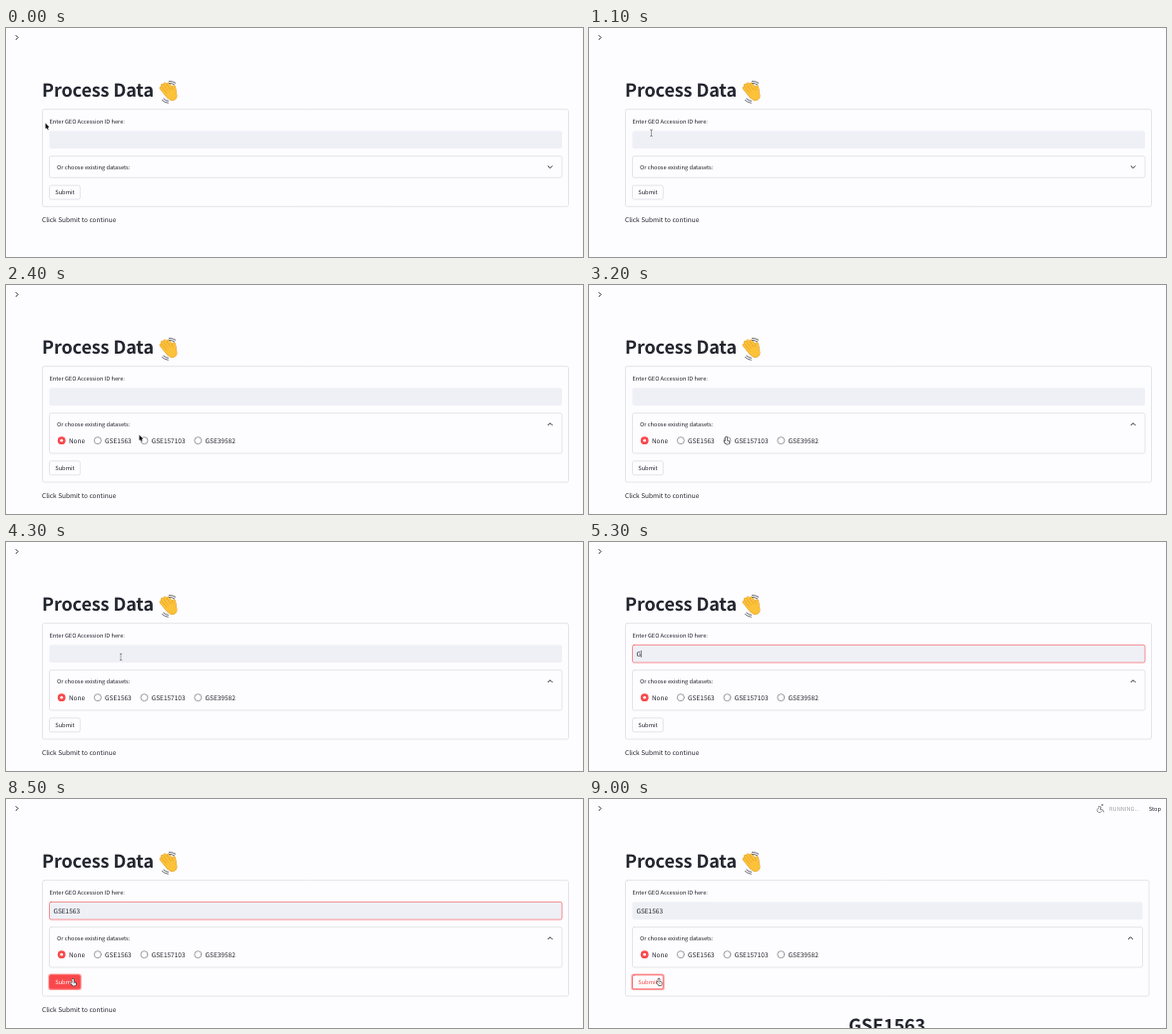
These frames come from a looping animation (578x230 px, 9.1 s). An HTML page with a canvas:

```html
<!DOCTYPE html>
<html lang="en">
<head>
<meta charset="utf-8">
<title>Process Data</title>
<style>
  html, body { margin: 0; width: 100%; height: 100%; overflow: hidden; background: #fdfcfe; }
  canvas { display: block; width: 578px; height: 230px; }
</style>
</head>
<body>
<canvas></canvas>
<script>
const W = 578, H = 230, LOOP = 9100, STEP = 100;
const INK = '#22242e', RED = '#f9484b', LINE = '#dadae1', GRAY = '#85868e', PAPER = '#fdfcfe';
const FONT = '"Noto Sans CJK JP", "Noto Sans CJK SC", "Noto Sans CJK", "Open Sans", sans-serif';
const SMALL = 5.67, BODY = 6.5, TITLE = 18;

const canvas = document.querySelector('canvas');
const c = canvas.getContext('2d');
const scale = window.devicePixelRatio || 1;
canvas.width = W * scale;
canvas.height = H * scale;

// Times of the main events in ms
const OPEN = 1760, RADIOS = 2000, FOCUS = 4700, HIDE = 5100, SHOW = 7500;
const PRESS = 8300, RELEASE = 8600, RUNNING = 8700, RESULT = 8900;

const ID = 'GSE1563';
const RADIO_LABELS = ['None', 'GSE1563', 'GSE157103', 'GSE39582'];

// Letters come quickly, digits after a pause
const keyTime = i => i < 3 ? 5200 + 250 * i : 6200 + 333 * (i - 3);

// Pointer stops: time, x, y
const STOPS = [
  [0, 39.5, 95.5], [1000, 60, 104], [1900, 131, 147.5], [3200, 138.5, 156.5],
  [4300, 115, 115.5], [7500, 95, 113], [8100, 66, 184.5], [9000, 71, 184]
];

function pointerAt(t) {
  const i = Math.max(1, STOPS.findIndex(s => s[0] >= t));
  const [t0, x0, y0] = STOPS[i - 1], [t1, x1, y1] = STOPS[i];
  const p = (t - t0) / (t1 - t0), e = p * p * (3 - 2 * p);
  return { x: x0 + (x1 - x0) * e, y: y0 + (y1 - y0) * e };
}

function text(s, x, y, size = BODY, color = INK, weight = 400) {
  c.font = `${weight} ${size}px ${FONT}`;
  c.textRendering = 'geometricPrecision';
  c.letterSpacing = weight === 700 ? '-0.1px' : '0px';
  c.fillStyle = color;
  c.fillText(s, x, y);
  return c.measureText(s).width;
}

function box(x0, y0, x1, y1, stroke, fill, width = 0.7) {
  c.beginPath();
  c.roundRect(x0, y0, x1 - x0, y1 - y0, 1.8);
  if (fill) { c.fillStyle = fill; c.fill(); }
  if (stroke) { c.strokeStyle = stroke; c.lineWidth = width; c.stroke(); }
}

function line(points, color, width) {
  c.beginPath();
  points.forEach(([x, y]) => c.lineTo(x, y));
  c.strokeStyle = color;
  c.lineWidth = width;
  c.lineCap = c.lineJoin = 'round';
  c.stroke();
}

function disc(x, y, r, fill) {
  c.beginPath();
  c.arc(x, y, r, 0, 2 * Math.PI);
  c.fillStyle = fill;
  c.fill();
}

function arc(x, y, r, from, to, color, width = 0.8) {
  c.beginPath();
  c.arc(x, y, r, from, to);
  c.strokeStyle = color;
  c.lineWidth = width;
  c.stroke();
}

// Draws around a local origin, turned by an angle
function at(x, y, angle, paint) {
  c.save();
  c.translate(x, y);
  c.rotate(angle);
  paint();
  c.restore();
}

function wavingHand() {
  at(165, 66, -0.65, () => {
    const edge = '#dd9826', skin = '#fcc23a';
    const thumb = [[1, 4], [5, 0], [6.5, -3.5]];
    line([[0, 1], [0, 2.5]], edge, 10);
    for (let i = 0; i < 4; i++) {
      const x = i * 2.5 - 3.9, tip = -9 - 3 * Math.sin((i + 0.6) * 0.85);
      const finger = [[x, 1], [x * 1.1, tip]];
      line(finger, edge, 3.2);
      line(finger, skin, 2.5);
    }
    line(thumb, edge, 3.6);
    line([[0, 1], [0, 2.5]], skin, 9.2);
    line(thumb, skin, 2.8);
    for (const r of [9, 11]) {
      arc(0, -2, r, -0.95, -0.35, '#555b66');
      arc(0, -2, r, 2.35, 2.95, '#555b66');
    }
  });
}

function chevron(x, y, angle, color) {
  at(x, y, angle, () => line([[-2, -1], [0, 1], [2, -1]], color, 1));
}

function outlined(parts, dark, light, width) {
  parts.forEach(p => line(p, dark, width + 1.1));
  parts.forEach(p => line(p, light, width));
}

function drawPointer(kind, { x, y }) {
  at(x, y, 0, () => {
    if (kind === 'text') {
      const serif = s => [[-1.1, 3.3 * s], [0, 2.9 * s], [1.1, 3.3 * s]];
      outlined([[[0, -3], [0, 3]], serif(-1), serif(1)], '#fff', '#555', 0.6);
    } else if (kind === 'hand') {
      outlined([[[-1, -3], [-1, 1]], [[-2.3, 0.7], [-0.5, 2.5]], [[0, 0.8], [1.2, 0.8], [1, 2.6], [0, 2.6]]],
        '#222', '#fff', 1.4);
    } else {
      const arrow = [[0, 0], [0, 5.5], [3.8, 4], [0, 0]];
      line(arrow, '#fff', 1);
      c.fillStyle = '#111';
      c.fill();
      line([[1.6, 4.2], [2.6, 6.3]], '#111', 1);
    }
  });
}

function drawStatus() {
  disc(514.2, 6, 1.1, GRAY);
  line([[510.2, 7.6], [513, 8], [512.2, 10.6], [514.6, 10.8], [515.6, 13]], GRAY, 1);
  arc(511.4, 11.2, 2.4, 0.5, 4.4, GRAY, 0.9);
  text('RUNNING...', 521, 11.5, SMALL, '#a0a1a9');
  text('Stop', 560.8, 11.5, SMALL);
}

function drawRadios() {
  let x = 55.7;
  RADIO_LABELS.forEach((label, i) => {
    if (i) arc(x, 156.2, 3.5, 0, 2 * Math.PI, GRAY);
    else { disc(x, 156.2, 3.9, RED); disc(x, 156.2, 1.4, '#fff'); }
    x += 20 + text(label, x + 7.2, 158.7);
  });
}

function draw(t) {
  c.setTransform(scale, 0, 0, scale, 0, 0);
  c.fillStyle = PAPER;
  c.fillRect(0, 0, W, H);

  const p = Math.min(1, Math.max(0, (t - OPEN) / 500));
  const bottom = 150.3 + 18.7 * (1 - (1 - p) ** 5);
  const left = 43.5, right = t < RESULT ? 557 : 554.5;
  const mouse = pointerAt(t);
  const visible = t < HIDE || t >= SHOW;
  const over = (y0, y1, x1 = right) => visible &&
    mouse.x > left && mouse.x < x1 && mouse.y > y0 && mouse.y < y1;

  chevron(11, 9.5, -Math.PI / 2, INK);
  if (t >= RUNNING) drawStatus();
  text('Process Data', 36, 69.4, TITLE, INK, 700);
  wavingHand();
  box(36.5, 81.7, right + 6.5, bottom + 29, LINE);

  // Text field
  const onField = over(103, 121);
  const focused = t >= FOCUS && t < RELEASE;
  text('Enter GEO Accession ID here:', left, 96.2, SMALL);
  box(left, 103.4, right, 121.1, focused ? RED : null, '#eef0f6', 0.6);
  const keys = [...ID].map((_, i) => keyTime(i)).filter(k => k <= t);
  const width = text(ID.slice(0, keys.length), 47.4, 114.7);
  const idle = t - Math.max(FOCUS, ...keys);
  if (focused && t < PRESS && idle % 1000 < 500) {
    const x = 47.8 + width;
    line([[x, 109.2], [x, 115.6]], INK, 0.6);
  }

  // Expander
  const onHeader = over(128.5, 150.3);
  const headColor = onHeader ? RED : INK;
  box(left, 128.7, right, bottom, LINE);
  text('Or choose existing datasets:', 51, 141.8, SMALL, headColor);
  chevron(right - 12, 139.7, t >= OPEN ? Math.PI : 0, headColor);
  if (t >= RADIOS) drawRadios();
  const onRadios = t >= RADIOS && over(151.5, 163, 230);

  // Button
  const top = bottom + 7.8, base = top + 14;
  const onButton = over(top, base, 74.5);
  const pressed = t >= PRESS && t < RELEASE;
  if (t >= PRESS) box(43.2, top - 0.4, 74.8, base + 0.4, '#ffa6a8', null, 1.8);
  box(left, top, 74.3, base, onButton ? RED : LINE, pressed ? RED : PAPER);
  text('Submit', 49.2, bottom + 16.9, 5.75, pressed ? '#fff' : onButton ? RED : INK);

  if (t >= RESULT) text(ID, 260, 233.6, TITLE, INK, 700);
  else text('Click Submit to continue', 36, bottom + 44.7);

  if (visible) {
    drawPointer(onField ? 'text' : onHeader || onRadios || onButton ? 'hand' : 'arrow', mouse);
  }
}

const start = performance.now();
function frame() {
  const t = (performance.now() - start) % LOOP;
  draw(Math.floor(t / STEP) * STEP);
  requestAnimationFrame(frame);
}
frame();
</script>
</body>
</html>
```
